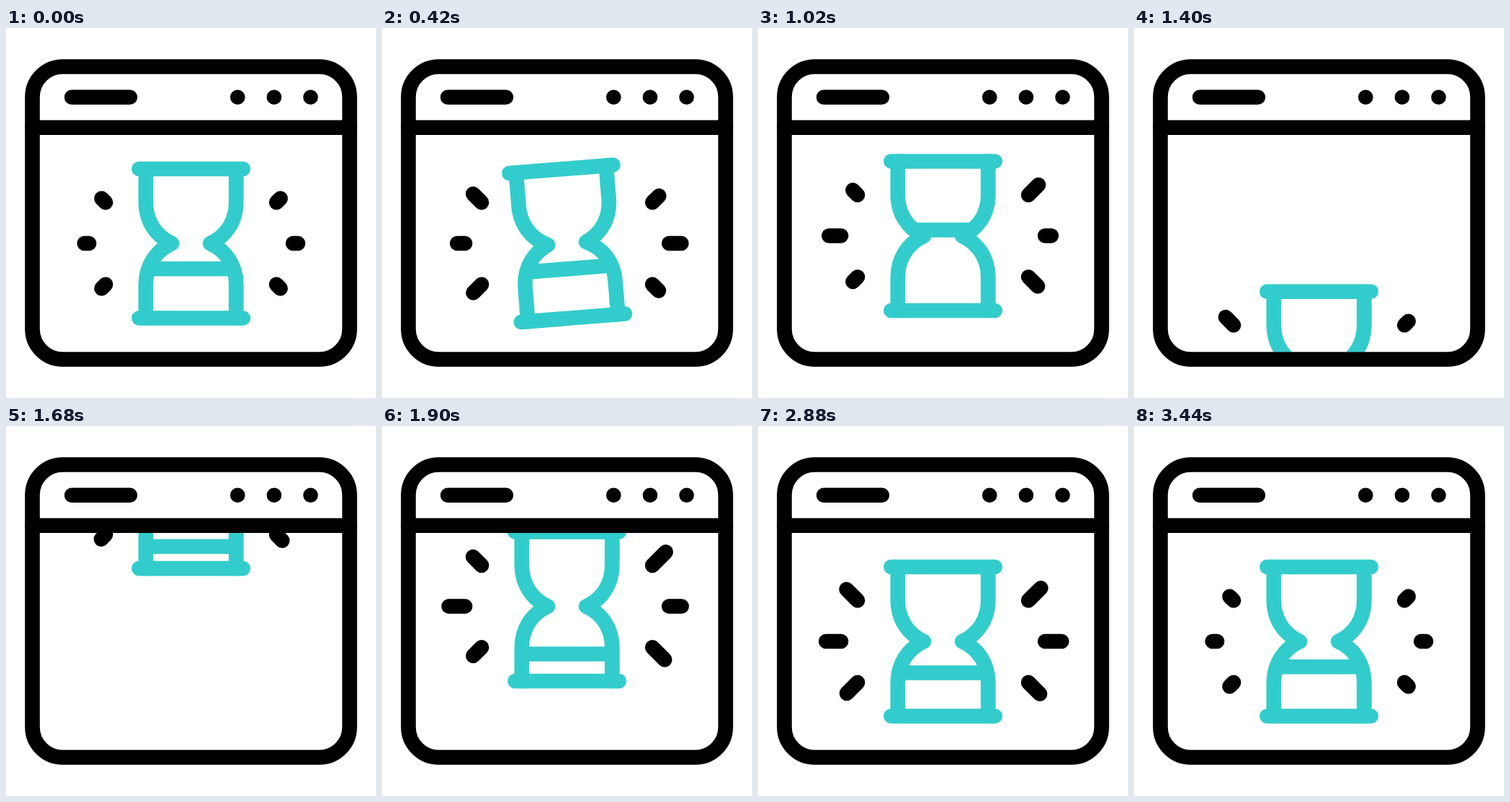
Write an HTML page that moves like this. It is 512 by 512 pixels and loops after 3.6 s.

```html
<!DOCTYPE html>
<html lang="en">
<head>
<meta charset="utf-8">
<title>Loading window</title>
<style>
  html, body { margin: 0; width: 100%; height: 100%; overflow: hidden; background: #fff; }
  svg { display: block; width: 100vw; height: 100vh; }
  .line { fill: none; stroke: #000; stroke-width: 20.6; stroke-linecap: round; stroke-linejoin: round; }
  .teal { stroke: #33cccc; }
</style>
</head>
<body>
<svg viewBox="0 0 512 512">
  <defs>
    <clipPath id="pane"><rect x="40" y="148" width="432" height="300"/></clipPath>
    <clipPath id="glass">
      <path d="M193.5 195V241C193.5 267 207 288 229.5 298.2C207 308.4 193.5 329 193.5 355V401.5H318.5V355C318.5 329 305 308.4 282.5 298.2C305 288 318.5 267 318.5 241V195Z"/>
    </clipPath>
  </defs>
  <g clip-path="url(#pane)">
    <g id="scene">
      <g id="rays" class="line"></g>
      <g id="hourglass" class="line teal">
        <g clip-path="url(#glass)"><path id="sand" d="M170 0H342"/></g>
        <path d="M184 195H328M184 401.5H328"/>
        <path d="M193.5 195V241C193.5 267 207 288 229.5 298.2C207 308.4 193.5 329 193.5 355V401.5"/>
        <path d="M318.5 195V241C318.5 267 305 288 282.5 298.2C305 308.4 318.5 329 318.5 355V401.5"/>
      </g>
    </g>
  </g>
  <g class="line">
    <rect x="36.5" y="53.5" width="439" height="405" rx="42"/>
    <path d="M36.5 137.7H475.5M91 95.8H171.5M320.5 95.8h.01M371 95.8h.01M421.5 95.8h.01"/>
  </g>
</svg>
<script>
const LOOP = 3600;
const $ = id => document.getElementById(id);
const scene = $('scene'), hourglass = $('hourglass'), sand = $('sand');

const clamp = u => Math.min(1, Math.max(0, u));
const ease = u => (1 - Math.cos(Math.PI * clamp(u))) / 2;

// Piecewise linear value through [time, value] points
function track(points, t) {
  let [t0, v0] = points[0];
  for (const [t1, v1] of points) {
    if (t < t1) return t1 === t0 ? v0 : v0 + (v1 - v0) * clamp((t - t0) / (t1 - t0));
    [t0, v0] = [t1, v1];
  }
  return v0;
}

// Cycle counts of the two alternating groups of rays
const beatA = [[160, 0], [420, .27], [1020, 2.1], [1400, 3.25], [1900, 4.72], [2880, 7.6], [3440, 9]];
const beatB = [[160, 0], [420, .82], [1020, 2.7], [1400, 4], [1900, 5.5], [2880, 8.6], [3440, 10]];

// Sand level: drains before the exit, fills after the entry
const drain = [[520, 333.3], [1020, 306.5], [1200, 298]];
const fill = [[1560, 375], [1900, 364], [2880, 341.5], [3440, 333.3]];

const SWAP = 1560;

const rays = [
  { x: 114.9, y: 298, dx: -1, dy: 0, base: 6.4, reach: 16, beat: beatB },
  { x: 397.2, y: 298, dx: 1, dy: 0, base: 6.8, reach: 18, beat: beatA },
  { x: 137.8, y: 241.4, dx: -1, dy: -1, base: 5.5, reach: 11, beat: beatA },
  { x: 374.2, y: 241.4, dx: 1, dy: -1, base: 5.5, reach: 13, beat: beatB },
  { x: 137.8, y: 354.9, dx: -1, dy: 1, base: 5.5, reach: 10.5, beat: beatA },
  { x: 374.2, y: 354.9, dx: 1, dy: 1, base: 5.5, reach: 11.5, beat: beatB }
];
for (const ray of rays) {
  ray.el = document.createElementNS('http://www.w3.org/2000/svg', 'path');
  $('rays').append(ray.el);
}

// Small wind-up and fall out; the entry from above mirrors it
function drop(t) {
  const out = t < SWAP;
  const s = out ? t - 970 : 2151 - t;
  const y = s > 0 ? .000984 * s * s - 13 : 13 * ease(-s / 290) - 13;
  return out ? y : -y;
}

function draw(t) {
  const turn = t < SWAP ? -180 * ease((t - 360) / 600) : 0;
  const level = track(t < SWAP ? drain : fill, t);
  scene.setAttribute('transform', `translate(0 ${drop(t)})`);
  hourglass.setAttribute('transform', `rotate(${turn} 256 298.2)`);
  sand.setAttribute('transform', `translate(0 ${level})`);
  for (const { el, x, y, dx, dy, base, reach, beat } of rays) {
    const len = base + reach * (1 - Math.cos(2 * Math.PI * track(beat, t))) / 2;
    el.setAttribute('d', `M${x} ${y}l${dx * len} ${dy * len}`);
  }
}

const start = performance.now();
function tick() {
  draw((performance.now() - start) % LOOP);
  requestAnimationFrame(tick);
}
draw(0);
requestAnimationFrame(tick);
</script>
</body>
</html>
```
